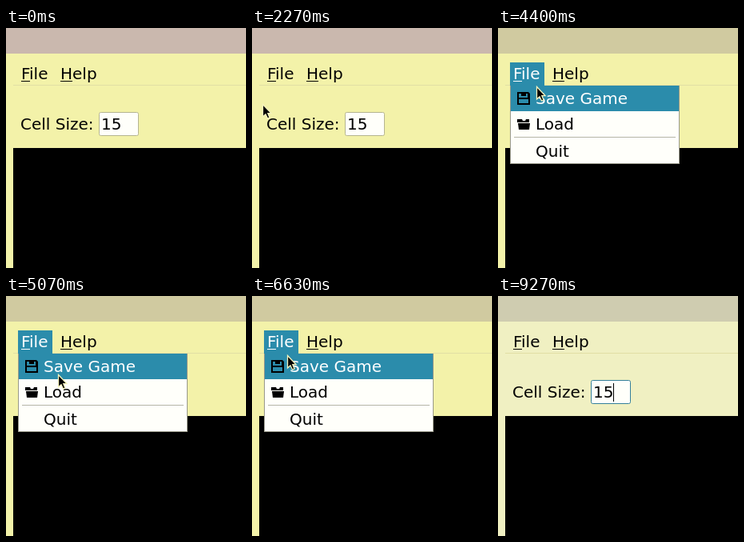
Write an HTML page that moves like this. It is 300 by 300 pixels and loops after 9.61 s.

```html
<!DOCTYPE html>
<html lang="en">
<head>
<meta charset="utf-8">
<title>Cell game menu</title>
<style>
  html, body { margin: 0; width: 100%; height: 100%; overflow: hidden; }
  svg { display: block; width: 100vw; height: 100vh; }
  text { font: 20px "DejaVu Sans", sans-serif; white-space: pre; }
  .lit { fill: #fff; }
</style>
</head>
<body>
<svg viewBox="0 0 300 300">
  <rect id="body" width="300" height="300"/>
  <rect id="title" width="300" height="32"/>
  <rect x="9" y="71" width="291" height="1" fill="#e1dfa4"/>
  <rect id="fileBg" x="15" y="43" width="43" height="29" fill="#2b8cab"/>
  <g id="file">
    <text x="19" y="64">File</text>
    <rect x="19" y="66" width="11" height="1"/>
  </g>
  <text x="68" y="64">Help</text>
  <rect x="68" y="66" width="15" height="1"/>

  <text x="18" y="127">Cell Size:</text>
  <rect id="entry" x="116.5" y="105.5" width="49" height="29" rx="2" fill="#fffffa"/>
  <text x="119" y="127">15</text>
  <rect id="caret" x="144" y="109" width="1" height="23"/>
  <rect x="9" y="150" width="291" height="150"/>

  <g id="menu">
    <rect x="15.5" y="72.5" width="211" height="97" fill="#fffffa" stroke="#99998a"/>
    <rect id="hover" x="16" width="210" height="32" fill="#2b8cab"/>
    <rect x="20" y="136" width="202" height="1" fill="#b5b5a9"/>
    <path fill-rule="evenodd" d="M24 80h14l2 2v14h-16zM26 82v5h11v-5h-2v3h-6v-3zM26 89v5h12v-5z"/>
    <path d="M24 114h6l1 2h3l1-2h4v4h-15zM25 119h15l-1 8h-13z"/>
    <text class="item" x="47" y="95">Save Game</text>
    <text class="item" x="47" y="127">Load</text>
    <text class="item" x="47" y="161">Quit</text>
  </g>
  <path id="pointer" d="M.5 .5V16L4 12.8L6.5 18L9 17L6.8 11.6H11Z" stroke="#f5f3bd" stroke-width="1.3"/>
</svg>
<script>
const LOOP = 9610, OPEN = 2800, CLOSE = 7290;
const BLINK = 500, FIRST_BLINK = 8270;
const $ = id => document.getElementById(id);
const items = [...document.querySelectorAll('.item')];
const rowTops = [72, 104, 137];

// Pointer stops: time, x, y
const stops = [
  [1600, 285, 312], [2070, 13, 95], [2250, 13, 95], [2900, 44, 58],
  [4280, 44, 58], [4730, 68, 141], [5400, 62, 58], [6170, 58, 170],
  [6780, 42, 57], [7240, 42, 57], [7870, 285, 312]
];

const ease = u => u * u * (3 - 2 * u);
const mix = (a, b, u) => a + (b - a) * u;

// Rises from 0 to 1 and falls back within the given span
function bump(t, from, length) {
  const u = (t - from) / length;
  return u > 0 && u < 1 ? Math.sin(Math.PI * u) ** 2 : 0;
}

function pointerAt(t) {
  const next = stops.findIndex(s => s[0] > t);
  if (next < 1) {
    // One sweep in from the right edge and back out
    return [312 - 290 * bump(t, 0, 800), 55 + 50 * Math.min(t / 800, 1)];
  }
  const [t0, x0, y0] = stops[next - 1], [t1, x1, y1] = stops[next];
  const u = ease((t - t0) / (t1 - t0));
  const dip = bump(t, 3270, 460) + bump(t, 6780, 460);
  return [mix(x0, x1, u) + 16 * dip, mix(y0, y1, u) + 88 * dip];
}

const show = (id, on) => $(id).setAttribute('visibility', on ? 'visible' : 'hidden');
const paint = (id, name, color) => $(id).setAttribute(name, color);

function draw(t) {
  const [x, y] = pointerAt(t).map(Math.round);
  const active = t >= OPEN, closed = t >= CLOSE, open = active && !closed;
  const inside = open && x > 15 && x < 227 && y < 169;
  const row = inside ? rowTops.filter(top => top <= y).length - 1 : -1;

  paint('body', 'fill', closed ? '#f0f0c2' : '#f3f2a9');
  paint('title', 'fill', closed ? '#cfccb0' : active ? '#d0caa0' : '#cab8ae');
  paint('entry', 'stroke', active ? '#347f9a' : '#b5b58f');

  show('fileBg', open);
  $('file').classList.toggle('lit', open);
  show('menu', open);
  show('hover', row >= 0);
  if (row >= 0) $('hover').setAttribute('y', rowTops[row]);
  items.forEach((item, i) => item.classList.toggle('lit', i === row));

  const beat = Math.floor((t - FIRST_BLINK) / BLINK);
  show('caret', beat >= 0 && beat % 2 === 0);
  $('pointer').setAttribute('transform', `translate(${x} ${y})`);
}

const start = performance.now();
function tick(now) {
  draw(Math.max(0, now - start) % LOOP);
  requestAnimationFrame(tick);
}
draw(0);
requestAnimationFrame(tick);
</script>
</body>
</html>
```
